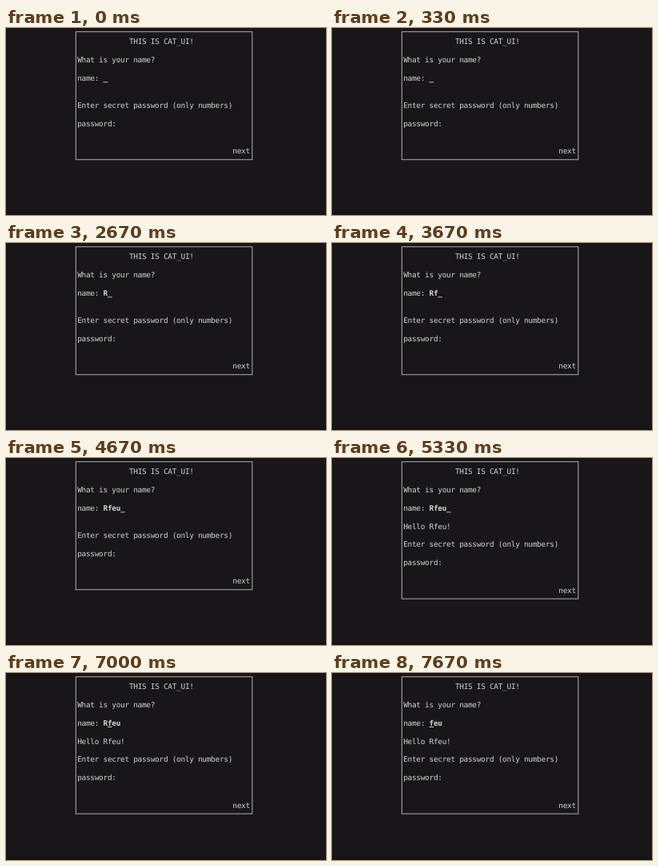
An HTML page for the animation above (8000 ms loop, 400x234 px).

```html
<!DOCTYPE html>
<html lang="en">
<head>
<meta charset="utf-8">
<style>
  html, body { margin: 0; width: 100%; height: 100%; overflow: hidden; background: #181619; }
  svg { display: block; width: 100vw; height: 100vh; }
  text { font: 9.45px "DejaVu Sans Mono", monospace; letter-spacing: -0.297px; fill: #d0d4d0; white-space: pre; text-rendering: geometricPrecision; }
  .bold { font-weight: bold; }
</style>
</head>
<body>
<svg viewBox="0 0 400 234">
  <rect y="230" width="400" height="4" fill="#171315"/>
  <rect id="box" x="87.3" y="4.7" width="220.5" fill="none" stroke="#aeb0ae"/>
  <g id="screen"></g>
  <rect id="underline" y="67" width="5.4" height="1" fill="#d0d4d0"/>
</svg>
<script>
const LOOP = 8000, COL = 5.392, ROW = 11.43, LEFT = 89.2, BASE = 20;
const NAME = "Rfeu", HELLO_AT = 5330;
const $ = id => document.getElementById(id);

// [start time, typed text, cursor column]
const steps = [
  [0, "", 0],
  [2670, NAME.slice(0, 1), 1],
  [3670, NAME.slice(0, 2), 2],
  [4330, NAME.slice(0, 3), 3],
  [4670, NAME, 4],
  [6330, NAME, 3],
  [6670, NAME, 2],
  [7000, NAME, 1],
  [7670, NAME.slice(1), 0],
];

function label(col, row, content, className = "") {
  const text = document.createElementNS("http://www.w3.org/2000/svg", "text");
  text.setAttribute("x", LEFT + col * COL);
  text.setAttribute("class", className);
  text.textContent = content;
  $("screen").append(text);
  const move = r => text.setAttribute("y", BASE + r * ROW);
  move(row);
  return { text, move };
}

label(12, 0, "THIS IS CAT_UI!");
label(0, 2, "What is your name?");
label(0, 4, "name:");
const input = label(6, 4, "", "bold");
const hello = label(0, 6, `Hello ${NAME}!`);
const lower = [
  [label(0, 7, "Enter secret password (only numbers)"), 7],
  [label(0, 9, "password:"), 9],
  [label(36, 12, "next"), 12],
];

function draw(now) {
  const t = now % LOOP;
  const [, typed, cursor] = steps.findLast(([start]) => t >= start);
  const greeted = t >= HELLO_AT;
  const atEnd = cursor === typed.length;

  input.text.textContent = typed + (atEnd ? "_" : "");
  $("underline").setAttribute("x", LEFT + (6 + cursor) * COL);
  $("underline").setAttribute("visibility", atEnd ? "hidden" : "visible");
  hello.text.setAttribute("visibility", greeted ? "visible" : "hidden");
  for (const [item, row] of lower) item.move(row + greeted);
  $("box").setAttribute("height", 14 * ROW + greeted * ROW);
  requestAnimationFrame(draw);
}
draw(0);
</script>
</body>
</html>
```
